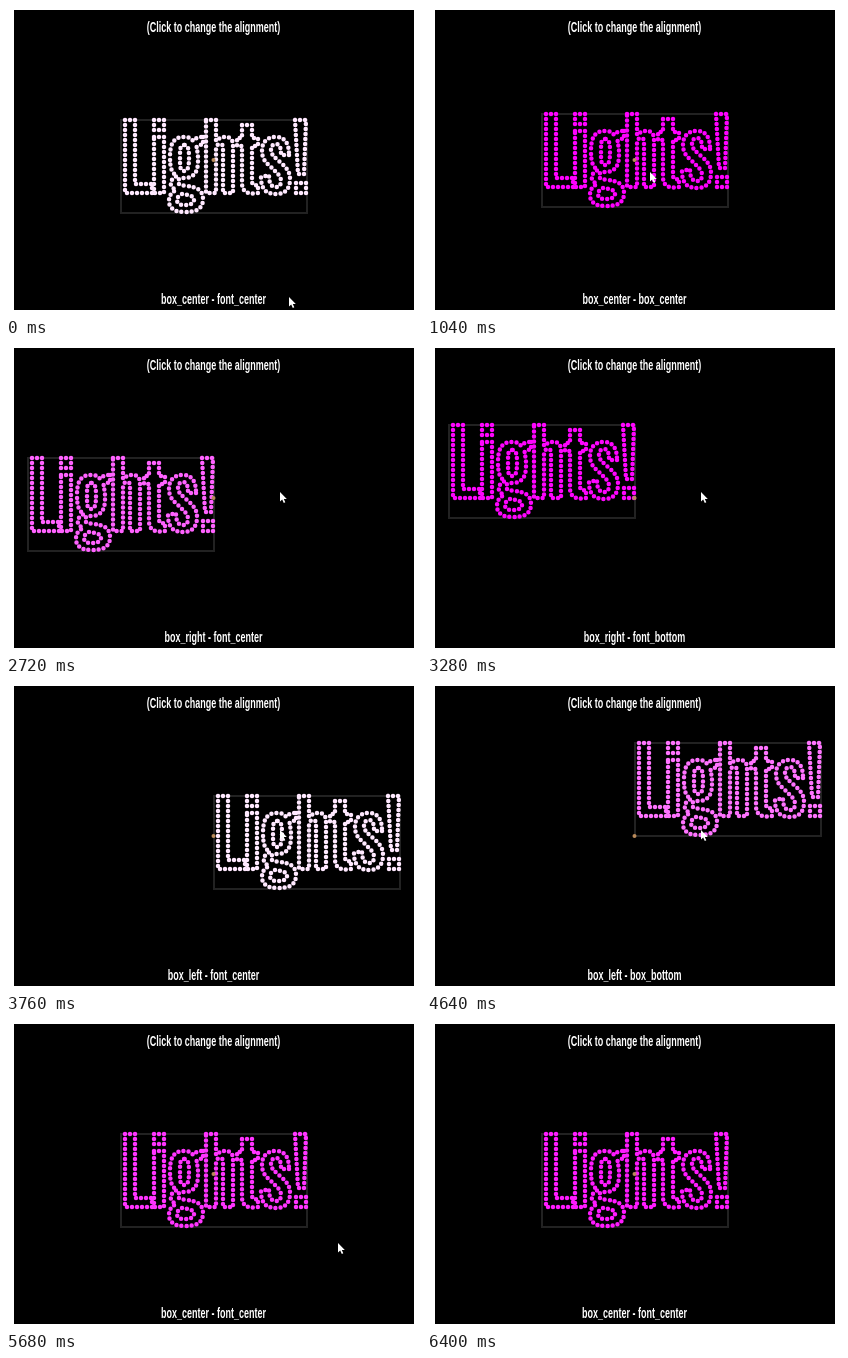
An HTML page that plays this animation: 415x310 px, repeating every 6480 ms.

```html
<!DOCTYPE html>
<html>
<head>
<meta charset="utf-8">
<style>
  html, body { margin: 0; width: 100%; height: 100%; overflow: hidden; background: #fff; }
  svg { display: block; }
  text { font: bold 15px "Liberation Sans", Arial, sans-serif; fill: #fff; text-anchor: middle; }
  .lights { fill: none; stroke-width: 4.5; stroke-linecap: round; stroke-dasharray: 0 5; }
</style>
</head>
<body>
<svg width="415" height="310" viewBox="0 0 415 310">
  <rect x="8" y="4" width="400" height="300"/>
  <g id="word">
    <rect x="1" y="1" width="186" height="93" fill="none" stroke="#222" stroke-width="2"/>
    <path class="lights" id="lights" d="
      M5 1H15V65H32V74H5Z
      M34 1H44V11H34Z M34 18H44V74H34Z
      M83 18V26C79 25 77 27 76 29C78 33 78 36 78 42C78 54 73 59 64 59C60 59 58 60 58 63
      C58 66 62 66 66 67C78 68 83 72 83 80C83 90 76 93 65 93C54 93 49 89 49 82C49 76 52 73 56 71
      C52 69 50 66 51 63C52 59 55 58 57 57C52 54 50 50 50 38C50 24 54 18 64 18C68 18 71 19 73 22C75 19 79 18 83 18Z
      M64 26C60 26 60 30 60 38C60 48 60 52 64 52C68 52 69 48 69 38C69 30 68 26 64 26Z
      M62 75C58 77 57 79 57 81C57 85 60 86 65 86C71 86 74 84 74 81C74 77 70 76 62 75Z
      M86 1H96V22C99 19 102 18 105 18C111 18 113 21 113 27V74H103V29C103 26 102 25 100 25C98 25 96 27 96 29V74H86Z
      M122 6H132V19H138V27H132V62C132 66 134 67 138 66V74C128 76 122 73 122 64V27H117V19H122Z
      M169 36H161C161 29 160 25 156 25C152 25 151 28 151 31C151 36 155 38 160 43C167 49 170 53 170 60
      C170 70 165 75 156 75C146 75 141 70 141 58L149 56C149 64 151 68 156 68C159 68 161 66 161 62
      C161 57 157 54 151 48C145 43 142 39 142 32C142 23 147 18 156 18C165 18 169 24 169 36Z
      M175 1H186L184 55H178Z M176 64H186V74H176Z"/>
  </g>
  <circle cx="207.5" cy="154" r="2" fill="#b98a5a"/>
  <text transform="translate(207.5 26) scale(.6 1)">(Click to change the alignment)</text>
  <text id="label" transform="translate(207.5 298) scale(.6 1)"></text>
  <path id="cursor" d="M0 0V9.5L2.2 7.6 3.8 11 5.3 10.3 3.8 7.1H6.8Z" fill="#fff"/>
</svg>
<script>
const LOOP = 6480, STEP = 80;
const $ = id => document.getElementById(id);

const LEFT = { box_center: 114, box_right: 21, box_left: 207 };
const TOP = { font_center: 113, box_center: 107, font_bottom: 80, box_bottom: 60 };
const columns = Object.keys(LEFT), rows = Object.keys(TOP);

// Each click moves to the next row, then to the next column
const clicks = [880, 1520, 2000, 2400, 2880, 3120, 3360, 3680, 4000, 4320, 4560, 4960];

// time, x, y
const cursorPath = [
  [0, 283, 291], [80, 283, 291], [800, 223, 166], [1120, 223, 166],
  [1760, 274, 148], [5280, 274, 148], [5680, 332, 223], [5920, 397, 307]
];

function cursorAt(t) {
  const i = cursorPath.findIndex(p => p[0] > t);
  if (i < 0) return null;
  const [t0, x0, y0] = cursorPath[i - 1], [t1, x1, y1] = cursorPath[i];
  const k = (t - t0) / (t1 - t0);
  return [x0 + (x1 - x0) * k, y0 + (y1 - y0) * k];
}

function draw(t) {
  const n = clicks.filter(c => c <= t).length;
  const column = columns[Math.floor(n / rows.length) % columns.length];
  const row = rows[n % rows.length];
  $("word").setAttribute("transform", `translate(${LEFT[column]} ${TOP[row]})`);
  $("label").textContent = `${column} - ${row}`;

  const glow = 0.5 + 0.5 * Math.cos(2 * Math.PI * (t - 4440) / 752);
  $("lights").setAttribute("stroke", `rgb(255,${Math.round(255 * glow)},255)`);

  const pos = cursorAt(t);
  $("cursor").style.display = pos ? "" : "none";
  if (pos) $("cursor").setAttribute("transform", `translate(${pos})`);
}

function tick() {
  draw(Math.floor(performance.now() % LOOP / STEP) * STEP);
  requestAnimationFrame(tick);
}
tick();
</script>
</body>
</html>
```
